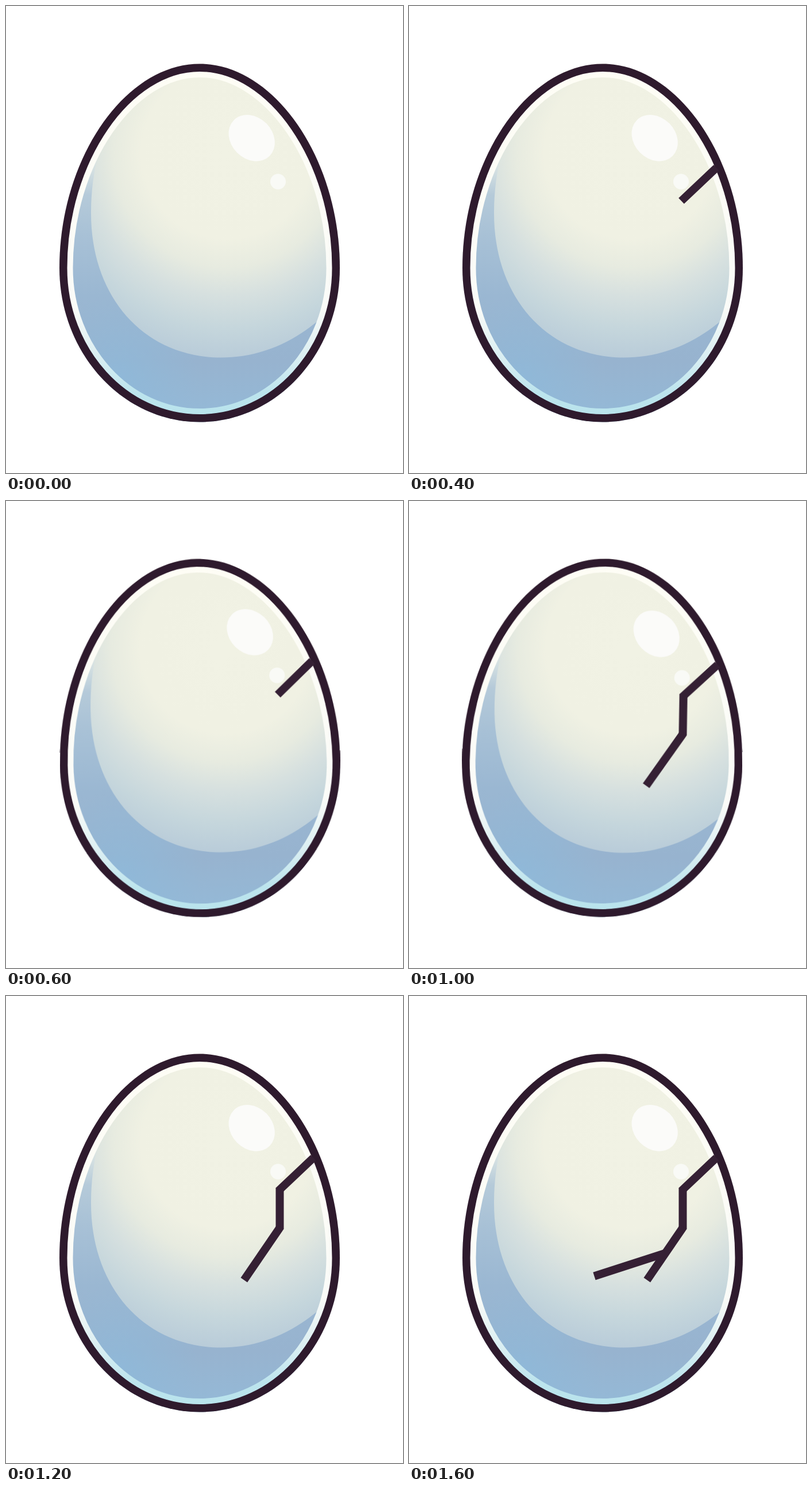
Animation of 691x811 px, one loop 6.8 s. Source, as an HTML page without scripts:

```html
<!DOCTYPE html>
<html lang="en">
<head>
<meta charset="utf-8">
<title>Cracking egg</title>
<style>
html, body { margin: 0; width: 100%; height: 100%; overflow: hidden; background: #fff; }
svg { display: block; width: 100%; height: 100%; }

/* One step of 200 ms is 2.94% of the loop */
.egg { transform-origin: 345.5px 405.5px; animation: wobble 6.8s step-end infinite; }
@keyframes wobble {
  0%, 5.88%, 11.76%, 17.64%, 23.52%, 100% { transform: none; }
  2.94%, 14.7%, 20.58% { transform: rotate(1deg); }
  8.82% { transform: rotate(-1deg); }
}

.cracks { stroke: #352034; stroke-width: 14; }
.cracks path { animation: var(--show) 6.8s step-end infinite; }
.c1 { --show: crack1; }
.c2 { --show: crack2; }
.c3 { --show: crack3; }
.c4 { --show: crack4; }
@keyframes crack1 { 0% { opacity: 0; } 5.88%, 100% { opacity: 1; } }
@keyframes crack2 { 0% { opacity: 0; } 11.76%, 100% { opacity: 1; } }
@keyframes crack3 { 0% { opacity: 0; } 14.7%, 100% { opacity: 1; } }
@keyframes crack4 { 0% { opacity: 0; } 20.58%, 100% { opacity: 1; } }
</style>
</head>
<body>
<svg viewBox="0 0 691 811" preserveAspectRatio="none">
  <defs>
    <path id="shell" d="M337 100.5 C467 100.5 581 265 581 455 C581 603 471 722.5 337 722.5 C203 722.5 93 603 93 455 C93 265 207 100.5 337 100.5Z"/>
    <clipPath id="inside"><use href="#shell"/></clipPath>
    <linearGradient id="shade" gradientUnits="userSpaceOnUse" x1="0" y1="250" x2="0" y2="710">
      <stop offset="0" stop-color="#e6ece4"/>
      <stop offset=".08" stop-color="#d3dfe1"/>
      <stop offset=".17" stop-color="#b5cad9"/>
      <stop offset=".32" stop-color="#a8c1d6"/>
      <stop offset=".55" stop-color="#9ab7d2"/>
      <stop offset=".8" stop-color="#97b3cf"/>
      <stop offset="1" stop-color="#94b9d7"/>
    </linearGradient>
    <radialGradient id="glow" gradientUnits="userSpaceOnUse" cx="195" cy="645" r="140">
      <stop offset="0" stop-color="#8bbbdd" stop-opacity=".6"/>
      <stop offset="1" stop-color="#8bbbdd" stop-opacity="0"/>
    </radialGradient>
    <radialGradient id="light" gradientUnits="userSpaceOnUse" cx="385" cy="255" r="355">
      <stop offset="0" stop-color="#f1f2e4"/>
      <stop offset=".42" stop-color="#f0f1e3"/>
      <stop offset=".56" stop-color="#e7ebe0"/>
      <stop offset=".7" stop-color="#d6e0df"/>
      <stop offset=".86" stop-color="#c5d6dc"/>
      <stop offset="1" stop-color="#b9ccd9"/>
    </radialGradient>
    <linearGradient id="rim" gradientUnits="userSpaceOnUse" x1="0" y1="101" x2="0" y2="722">
      <stop offset="0" stop-color="#fefdf5"/>
      <stop offset=".68" stop-color="#fafbf8"/>
      <stop offset=".82" stop-color="#d9eef2"/>
      <stop offset=".92" stop-color="#bce4ed"/>
      <stop offset="1" stop-color="#b8e3ec"/>
    </linearGradient>
  </defs>
  <g class="egg">
    <g clip-path="url(#inside)">
      <use href="#shell" fill="url(#shade)"/>
      <use href="#shell" fill="url(#glow)"/>
      <path fill="url(#light)" d="M148 360 C148 505 240 610.5 375 610.5 C440 610.5 495 585 535 553 L620 490 V90 H200 L160 262 C152 290 148 325 148 360Z"/>
      <use href="#shell" fill="none" stroke="url(#rim)" stroke-width="47"/>
      <use href="#shell" fill="none" stroke="#2e1a2d" stroke-width="27"/>
    </g>
    <ellipse cx="427.7" cy="229.3" rx="44" ry="36" transform="rotate(45 427.7 229.3)" fill="#fbfbf9"/>
    <circle cx="473.5" cy="305" r="13.5" fill="#f9faf6"/>
    <g class="cracks">
      <path class="c1" d="M535 281 L474 338.5"/>
      <path class="c2" d="M476.5 334 V405"/>
      <path class="c3" d="M477.5 401 L414.3 493.3"/>
      <path class="c4" d="M446 446.7 L322.5 486.5"/>
    </g>
  </g>
</svg>
</body>
</html>
```
